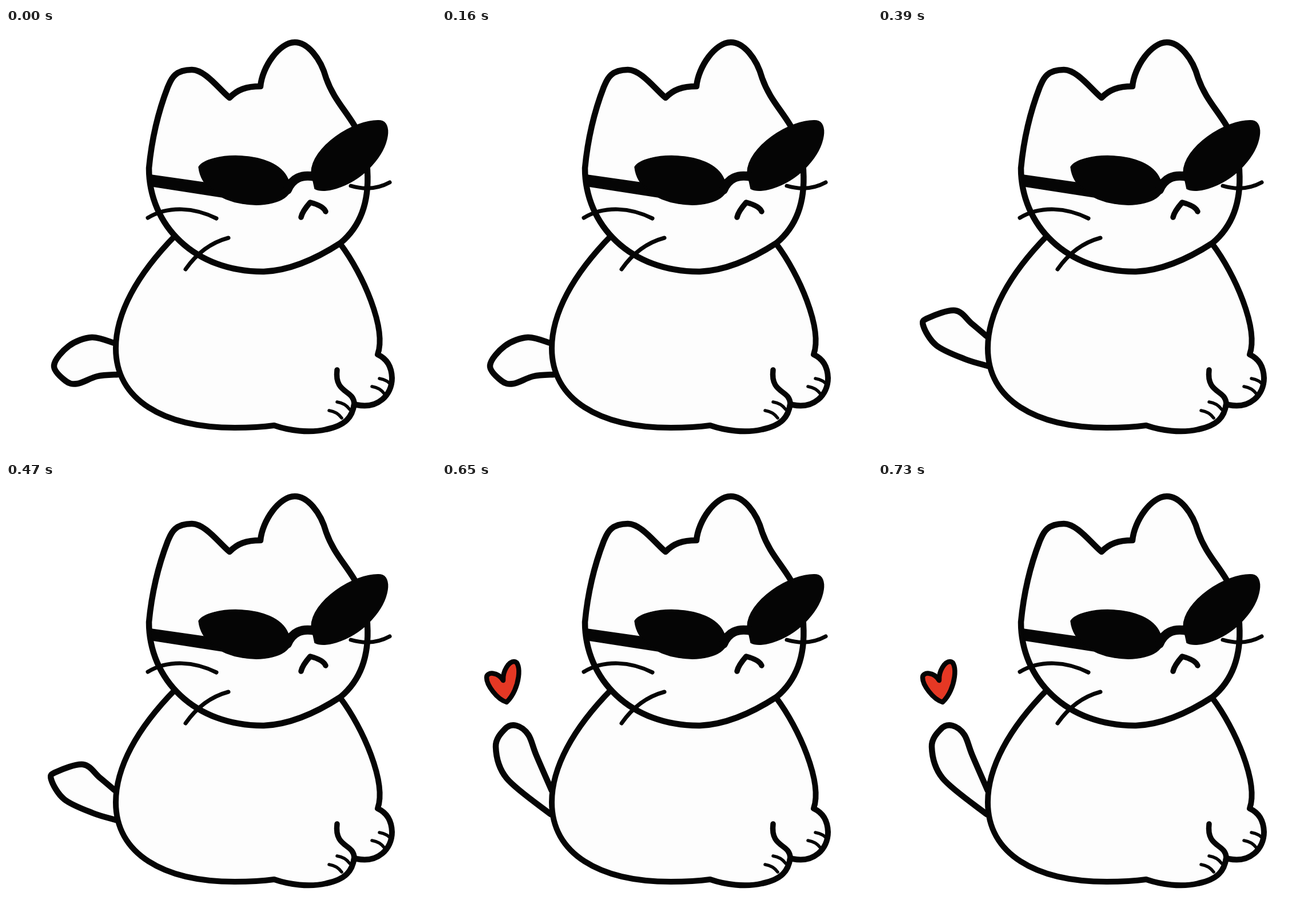
Animation of 752 by 745 pixels, one loop 780 ms. Source, as an HTML page with a canvas:

```html
<!DOCTYPE html>
<html lang="en">
<head>
<meta charset="utf-8">
<title>Cool cat</title>
<style>
  html, body { margin: 0; width: 100%; height: 100%; overflow: hidden; background: #fff; }
  canvas { display: block; }
</style>
</head>
<body>
<canvas id="stage" width="752" height="745"></canvas>
<script>
const ctx = document.getElementById('stage').getContext('2d');
const INK = '#050505', FUR = '#fdfdfd', RED = '#e53824';
const LOOP = 780, REST = 260, STEP = 130;

const head = new Path2D(`M391 122
  C372 106 348 73 325 73 C292 73 288 93 283 103
  C264 152 254 203 250 245 C250 345 330 427 451 426
  C500 424 545 402 585 376 C622 345 635 300 632 250
  C632 220 622 195 609 170 C592 142 572 122 560 88
  C550 52 527 25 505 25 C478 25 448 68 445 102
  C420 102 404 108 391 122Z`);

const body = new Path2D(`M297 362
  C228 432 192 500 192 560 C192 650 275 699 400 699
  Q440 699 469 695 C495 704 530 709 560 702
  C594 695 606 680 609 657 L613 659
  C650 667 675 642 675 612 Q674 582 650 571
  C666 525 624 430 585 378`);

const foreleg = new Path2D('M609 657C608 632 574 640 579 598');
const toes = new Path2D(['579 654', '565 669', '640 627', '653 613']
  .map(start => `M${start}q14 2 22 13`).join(''));
const whiskers = new Path2D(
  'M248 332C285 310 330 314 368 333M314 422Q344 379 389 367M603 276Q640 287 671 270');
const mouth = new Path2D('M516 331Q518 321 532 305Q555 311 559 321');

const shades = new Path2D(`
  M337 243C352 217 470 211 493 264L497 285C480 325 345 318 337 243Z
  M534 253C534 209 608 159 655 162C675 165 672 205 640 240C610 274 560 292 540 281Z
  M254 257L345 270L385 297L256 277Z`);
const bridge = new Path2D('M492 283Q505 253 540 260');

const heart = new Path2D(`M107 347
  C106 330 117 314 126 314 C140 314 137 362 113 385
  C96 380 78 355 78 342 C78 331 98 332 107 347Z`);

// A smooth curve through a few key points.
function spline(text) {
  const pts = text.split(' ').map(p => p.split(',').map(Number));
  const path = new Path2D();
  path.moveTo(...pts[0]);
  for (let i = 1; i < pts.length; i++) {
    const from = pts[i - 1], to = pts[i];
    const before = pts[i - 2] || from, after = pts[i + 1] || to;
    const out = from.map((v, k) => v + (to[k] - before[k]) / 6);
    const into = to.map((v, k) => v - (after[k] - from[k]) / 6);
    path.bezierCurveTo(...out, ...into, ...to);
  }
  return path;
}

// One tail per pose, from its upper root round the tip to its lower root.
const tails = [
  '189,551 150,541 110,556 84,590 104,617 125,622 160,609 196,606',
  '191,541 152,523 102,538 92,558 113,588 157,595 194,606',
  '190,539 164,517 135,494 88,507 79,520 102,555 152,579 192,591',
  '190,545 161,518 148,489 120,464 101,455 80,474 88,515 127,557 193,586',
  '192,540 165,478 151,442 130,426 110,432 94,463 113,518 190,581'
].map(spline);

function fill(path, color) {
  ctx.fillStyle = color;
  ctx.fill(path);
}

function ink(path, width) {
  ctx.lineWidth = width;
  ctx.stroke(path);
}

function shape(path, color, width) {
  fill(path, color);
  ink(path, width);
}

function draw(pose) {
  ctx.fillStyle = '#fff';
  ctx.fillRect(0, 0, 752, 745);
  ctx.strokeStyle = INK;
  ctx.lineCap = ctx.lineJoin = 'round';

  shape(tails[pose], FUR, 10.5);
  shape(body, FUR, 10);
  ink(foreleg, 9.5);
  ink(toes, 5.5);
  shape(head, FUR, 10.5);
  ink(whiskers, 7);
  ink(mouth, 9.5);
  shape(shades, INK, 1.5);
  ink(bridge, 16);
  if (pose === tails.length - 1) shape(heart, RED, 8.5);
}

function tick() {
  const t = performance.now() % LOOP;
  draw(t < REST ? 0 : 1 + Math.floor((t - REST) / STEP));
  requestAnimationFrame(tick);
}
tick();
</script>
</body>
</html>
```
